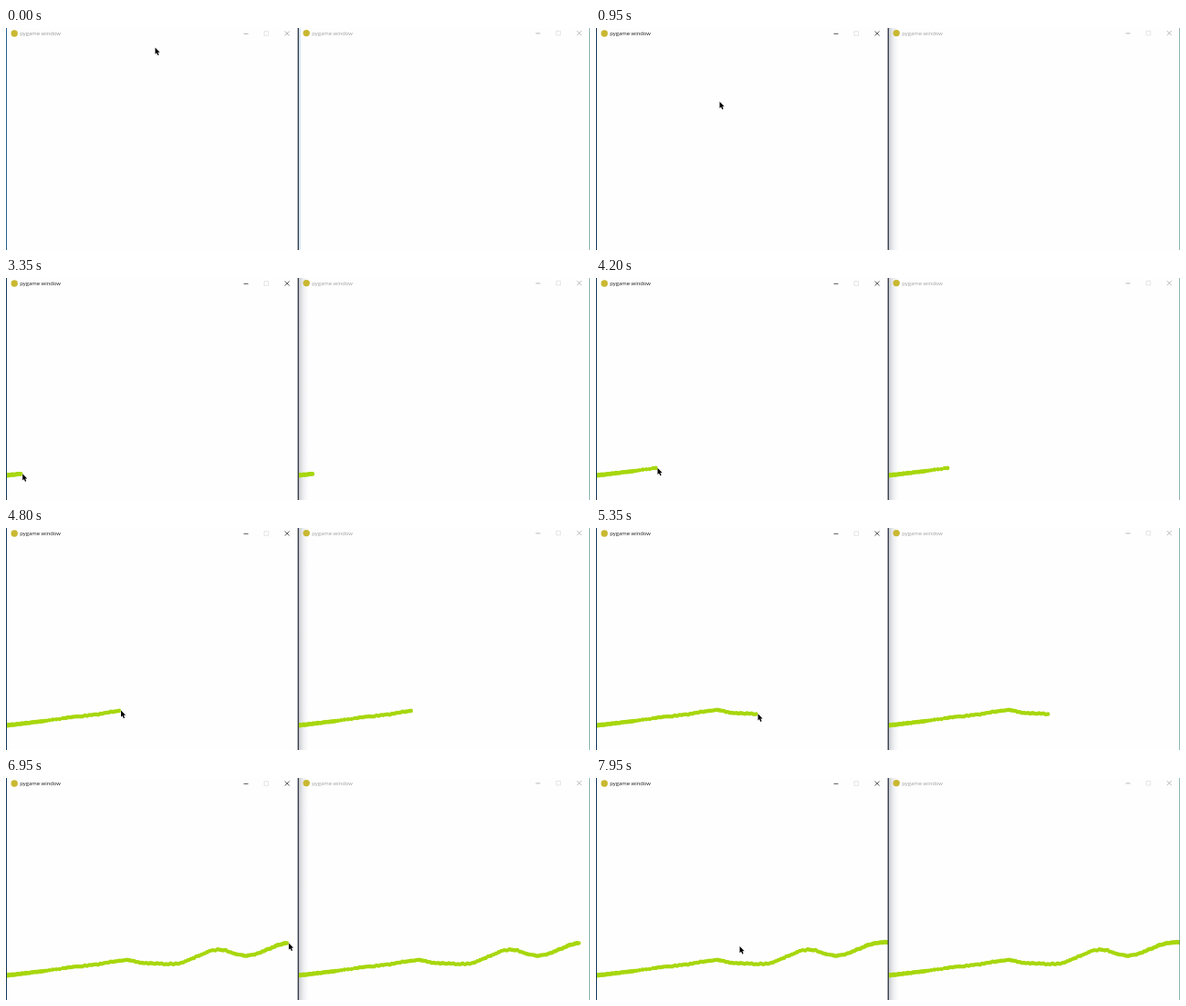
Animation, 640 px wide and 244 px high, one loop 8000 ms. Source, as an HTML page:

```html
<!DOCTYPE html>
<html lang="en">
<head>
<meta charset="utf-8">
<title>Shared canvas</title>
<style>
  html, body { margin: 0; width: 100%; height: 100%; overflow: hidden; background: #fefefe; }
  svg { display: block; width: 100vw; height: 100vh; }
  text { font: 5.9px "Open Sans", "Noto Sans", sans-serif; }
</style>
</head>
<body>
<svg viewBox="0 0 640 244">
  <defs>
    <linearGradient id="shade">
      <stop offset="0" stop-color="#8f939c" stop-opacity=".48"/>
      <stop offset=".45" stop-color="#b9bcc6" stop-opacity=".24"/>
      <stop offset="1" stop-color="#d8dae2" stop-opacity="0"/>
    </linearGradient>
    <clipPath id="leftArea"><rect x="1" y="12" width="319" height="232"/></clipPath>
    <clipPath id="rightArea"><rect x="321" y="12" width="319" height="232"/></clipPath>
    <g id="bar">
      <circle cx="9.2" cy="6" r="3.7" fill="#c9b831"/>
      <text x="15.3" y="8.2" fill="currentColor">pygame window</text>
      <g fill="none" stroke="currentColor" stroke-width=".75">
        <path d="M260.5 6.3h5"/>
        <path d="M283 3.7h4.6v4.6h-4.6z" stroke="#dcdcdc"/>
        <path d="M305.7 3.5l5 5m0-5l-5 5"/>
      </g>
    </g>
  </defs>
  <rect width="640" height="244" fill="#fefefe"/>
  <rect id="glow" x="321" width="2" height="244" fill="#d9e8f4"/>
  <rect id="shadow" x="321" width="11" height="244" fill="url(#shade)"/>
  <use id="leftBar" href="#bar"/>
  <use href="#bar" x="320" y="-.4" color="#a0a0a0"/>
  <g fill="none" stroke="#a7d70d" stroke-width="4.6" stroke-linecap="round">
    <g clip-path="url(#leftArea)"><path id="ink"/></g>
    <g clip-path="url(#rightArea)"><use href="#ink" x="319.7"/></g>
  </g>
  <rect id="edge" width="1" height="244"/>
  <rect x="319.6" width="1.4" height="244" fill="#39414e"/>
  <rect x="639.3" width=".7" height="244" fill="#5d9490"/>
  <path id="cursor" d="M0 0V7.3L1.6 5.8 2.8 8.6 4.1 8 2.9 5.3H5.1Z" fill="#000"
        stroke="#fff" stroke-width=".5" paint-order="stroke"/>
</svg>
<script>
const LOOP = 8000, STEP = 50, DAB_GAP = 25, INK_START = 2350, INK_END = 7500;
const $ = id => document.getElementById(id);

// Bends of the drawn line: x, y
const line = [[0, 217], [30, 213.6], [67, 208.5], [100, 204.9], [130, 200.2], [150, 203.2],
  [183, 204.4], [234, 188.7], [263, 195.2], [306, 181.7], [322, 180]];

// Pen travel: time, x
const travel = [[INK_START, 2], [3150, 12], [4000, 40], [4200, 65.5], [5350, 175.5],
  [6300, 276], [6800, 303], [INK_END, 322]];

// Pointer without ink: time, x, y
const approach = [[650, 163.5, 21.5], [950, 135.5, 81], [1950, 9, 211], [INK_START, 4, 217]];
const leave = [[INK_END, 324, 180], [7600, 486, 210], [7750, 486, 210], [7900, 154, 177], [7950, 157.5, 185]];

// Monotone cubic interpolation through keys
function at(keys, v, col = 1) {
  const n = keys.length - 1;
  if (v <= keys[0][0]) return keys[0][col];
  if (v >= keys[n][0]) return keys[n][col];
  const i = keys.findIndex(k => k[0] > v) - 1;
  const slope = k => (keys[k + 1][col] - keys[k][col]) / (keys[k + 1][0] - keys[k][0]);
  const tangent = k => {
    if (k === 0) return slope(0);
    if (k === n) return slope(n - 1);
    const a = slope(k - 1), b = slope(k);
    return a * b <= 0 ? 0 : 2 * a * b / (a + b);
  };
  const [a, b] = [keys[i], keys[i + 1]], h = b[0] - a[0], s = (v - a[0]) / h;
  return a[col] * (1 + 2 * s) * (1 - s) ** 2 + tangent(i) * h * s * (1 - s) ** 2
       + b[col] * s * s * (3 - 2 * s) + tangent(i + 1) * h * s * s * (s - 1);
}

function penAt(t) {
  const x = at(travel, t);
  return [x, at(line, x)];
}

function pointerAt(t) {
  if (t >= INK_START && t < INK_END) {
    const [x, y] = penAt(t);
    return [x + 2, y];
  }
  const keys = t < INK_START ? approach : leave;
  return [at(keys, t, 1), at(keys, t, 2)];
}

// Round dabs with a shaky hand; slow parts pile up and look thicker
let seed = 7;
const random = () => (seed = seed * 16807 % 2147483647) / 2147483647;
const dabs = [];
for (let t = INK_START; t <= INK_END; t += DAB_GAP) {
  const [x, y] = penAt(t);
  dabs.push(`M${x.toFixed(1)} ${(y + random() - .5).toFixed(1)}h.01`);
}

function render(time) {
  const t = Math.floor(time % LOOP / STEP) * STEP;
  const focus = Math.min(1, t / 250);
  $('leftBar').setAttribute('color', t < STEP ? '#999' : '#1c1c1c');
  $('edge').setAttribute('fill', t < STEP ? '#245f91' : '#17385c');
  $('glow').setAttribute('opacity', 1 - focus);
  $('shadow').setAttribute('opacity', focus);
  const count = Math.max(0, Math.floor((t - INK_START) / DAB_GAP) + 1);
  $('ink').setAttribute('d', dabs.slice(0, count).join(''));
  $('cursor').setAttribute('transform', `translate(${pointerAt(t).map(v => v.toFixed(2))})`);
}

let start;
function tick(now) {
  start ??= now;
  render(now - start);
  requestAnimationFrame(tick);
}
render(0);
requestAnimationFrame(tick);
</script>
</body>
</html>
```
